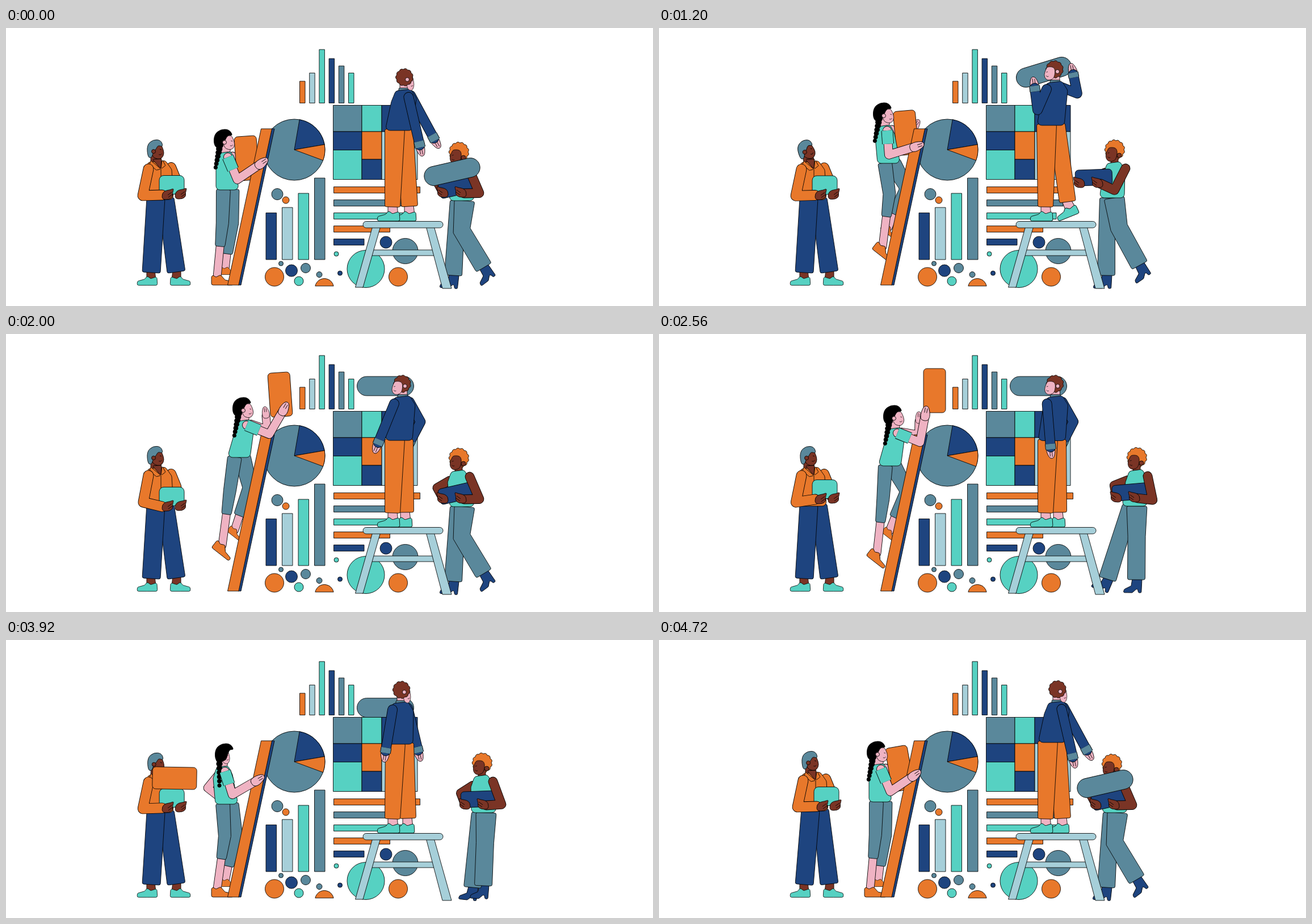
These frames come from a looping animation (1140x491 px, 4.8 s). An HTML page with a canvas:

```html
<!DOCTYPE html>
<html lang="en">
<meta charset="utf-8">
<title>Building with charts</title>
<style>
html, body { margin: 0; width: 100%; height: 100%; overflow: hidden; background: #fff }
canvas { display: block }
</style>
<canvas id="stage" width="1140" height="491"></canvas>
<script>
const g = document.getElementById('stage').getContext('2d');
const ORANGE = '#e8782b', NAVY = '#1e447f', TEAL = '#56d1c2', SLATE = '#5a889b',
  PALE = '#a6cfd9', PINK = '#efb3c3', BROWN = '#7a3425', BLACK = '#000';
const LOOP = 4800, STEP = 80, LAST = LOOP - STEP, LINE = .85;
let t = 0;

// ---- motion: a track is a few keys [time, ...values], eased, closing on its first key ----
const clamp = u => Math.min(1, Math.max(0, u));
const ease = u => u * u * (3 - 2 * u);
const mix = (a, b, u) => a.map((v, i) => v + (b[i] - v) * u);
const add = ([x, y], dx, dy) => [x + dx, y + dy];
const track = (...k) => k.at(-1)[0] < LAST ? [...k, [LAST, ...k[0].slice(1)]] : k;
function now(keys) {
  const i = keys.findIndex(k => k[0] > t);
  if (i < 0) return keys.at(-1).slice(1);
  if (!i) return keys[0].slice(1);
  const [a, b] = [keys[i - 1], keys[i]];
  return mix(a, b, ease((t - a[0]) / (b[0] - a[0]))).slice(1);
}
const pose = rig => Object.fromEntries(Object.entries(rig).map(([k, v]) => [k, now(v)]));

// elbow or knee between a and b for two bones; bend is the side, or less for foreshortening
function joint(a, b, l1, l2, bend) {
  const dx = b[0] - a[0], dy = b[1] - a[1], d = Math.hypot(dx, dy) || 1;
  const along = d < l1 + l2 ? (d * d + l1 * l1 - l2 * l2) / (2 * d) : d * l1 / (l1 + l2);
  const h = bend * Math.sqrt(Math.max(0, l1 * l1 - along * along)) * (d < l1 + l2);
  return [a[0] + (dx * along - dy * h) / d, a[1] + (dy * along + dx * h) / d];
}
const bearing = (a, b) => Math.atan2(b[1] - a[1], b[0] - a[0]) * 180 / Math.PI;

// ---- drawing ----
function paint(fill, build) {
  g.beginPath();
  build();
  g.fillStyle = fill;
  g.fill();
  g.stroke();
}
function poly(fill, p, r = 3) {
  const n = p.length;
  paint(fill, () => {
    g.moveTo((p[0] + p[n - 2]) / 2, (p[1] + p[n - 1]) / 2);
    for (let i = 0; i < n; i += 2) g.arcTo(p[i], p[i + 1], p[(i + 2) % n], p[(i + 3) % n], r);
    g.closePath();
  });
}
function blob(fill, p) {
  const n = p.length;
  paint(fill, () => {
    g.moveTo((p[0] + p[n - 2]) / 2, (p[1] + p[n - 1]) / 2);
    for (let i = 0; i < n; i += 2)
      g.quadraticCurveTo(p[i], p[i + 1], (p[i] + p[(i + 2) % n]) / 2, (p[i + 1] + p[(i + 3) % n]) / 2);
    g.closePath();
  });
}
const rect = (fill, x, y, x2, y2, r = 0) => paint(fill, () => g.roundRect(x, y, x2 - x, y2 - y, r));
const disc = (fill, x, y, r) => paint(fill, () => g.arc(x, y, r, 0, 7));
function line(...p) {
  g.beginPath();
  for (let i = 0; i < p.length; i += 2) g.lineTo(p[i], p[i + 1]);
  g.stroke();
}
function at(x, y, deg, draw, sx = 1, sy = 1) {
  g.save();
  g.translate(x, y);
  g.rotate(deg * Math.PI / 180);
  g.scale(sx, sy);
  draw();
  g.restore();
}
function block(fill, [x, y, deg, s = 1], w, h, r) {
  if (s > 0) at(x, y, deg, () => rect(fill, -w / 2, -h / 2, w / 2, h / 2, r), s, s);
}
function limb(fill, points, w, cap = 'round') {
  g.save();
  g.lineCap = cap;
  g.lineJoin = 'round';
  for (const [c, d] of [[BLACK, w + LINE], [fill, w - LINE]]) {
    g.strokeStyle = c;
    g.lineWidth = d;
    line(...points.flat());
  }
  g.restore();
}
// cloth leg through joints, one width per joint
function taper(fill, joints, widths) {
  const side = s => joints.map(([x, y], i) => {
    const a = joints[Math.max(0, i - 1)], b = joints[Math.min(joints.length - 1, i + 1)];
    const d = Math.hypot(b[0] - a[0], b[1] - a[1]) || 1, w = s * widths[i] / 2;
    return [x + (b[1] - a[1]) / d * w, y - (b[0] - a[0]) / d * w];
  });
  poly(fill, [...side(1), ...side(-1).reverse()].flat(), 3);
}
const torso = (fill, [nx, ny], [hx, hy], s, w) =>
  poly(fill, [nx - s * .65, ny + 3, nx + s * .55, ny, nx + s, ny + 16, hx + w, hy, hx - w, hy, nx - s, ny + 22], 7);

function hand(skin, from, [x, y], s = 1) {
  at(x, y, bearing(from, [x, y]), () => {
    blob(skin, [-5, -6, 4, -8, 13, -7, 21, -4, 21, 3, 12, 7, 3, 9, -5, 6]);
    line(9, -2, 18, -2);
    line(9, 2, 17, 2);
  }, s, s);
}
function fist(skin, [x, y], flip = 1) {
  at(x, y, 0, () => {
    blob(skin, [-9, -3, -3, -8, 5, -9, 12, -12, 9, -3, 10, 3, 4, 8, -9, 8]);
    line(1, 0, 8, -5);
    line(2, 4, 9, -1);
  }, flip);
}
// footwear hangs from the middle of the trouser cuff
function shoe(skin, x, y, deg = 0, s = 1, flip = 1) {
  at(x, y, deg, () => {
    poly(skin, [-9, 16, 9, 16, 7, -2, -9, -2], 1);
    poly(TEAL, [-28, 26, -27, 18, -13, 14, -8, 8, -1, 13, 11, 9, 12, 26], 3);
  }, s * flip, s);
}
const boot = (knee, [x, y]) => at(x + 1, y + 1, (bearing(knee, [x, y]) - 90) * 1.2, () =>
  poly(NAVY, [-24, 22, -22, 16, -10, 10, -8, -3, 9, -3, 8, 22, 3, 22, 1, 14, -8, 22], 2));
const flat = ([x, y], deg, s) => at(x, y, deg, () =>
  poly(ORANGE, [-10, -1, -2, 4, 6, 0, 14, 9, 28, 12, 29, 18, -10, 18], 3), s, s);

// profile looking right; a negative sx looks left
function face(skin, x, y, sx = 1, s = 1) {
  at(x, y, 0, () => {
    blob(skin, [-10, -11, 6, -13, 10, -7, 14, 5, 10, 14, 2, 16, -8, 11]);
    g.beginPath();
    g.arc(6, 4, 4, .5, 2);
    g.stroke();
    line(6, -2, 9, -1);
  }, sx * s, s);
}
function curls(fill, r, n) {
  const pt = (k, d) => [d * Math.cos(k * 2 * Math.PI / n), d * Math.sin(k * 2 * Math.PI / n)];
  paint(fill, () => {
    g.moveTo(...pt(0, r));
    for (let k = 0; k < n; k++) g.quadraticCurveTo(...pt(k + .5, r * 1.25), ...pt(k + 1, r));
  });
}

// ---- charts and furniture ----
function bars(list, w, base) {
  for (const [x, top, c] of list) rect(c, x, top, x + w, base);
}
function charts() {
  [[94, ORANGE], [79.5, PALE], [38, TEAL], [54, NAVY], [67, SLATE], [79.5, TEAL]]
    .forEach(([top, c], i) => bars([[517.5 + 17.2 * i, top, c]], 9.5, 132.5));
  [[326.5, NAVY], [317, PALE], [292, TEAL], [265, SLATE]]
    .forEach(([top, c], i) => bars([[458 + 28.5 * i, top, c]], 18.5, 409));
  [[729.5, ORANGE], [712, SLATE], [700, TEAL], [676.5, ORANGE], [631, NAVY]]
    .forEach(([x, c], i) => rect(c, 577.5, 280.5 + 23 * i, x, 291.5 + 23 * i));
  disc(SLATE, 508, 215, 54);
  for (const [c, a, b] of [[NAVY, -1.4, -.17], [ORANGE, -.17, .356]])
    paint(c, () => { g.moveTo(508, 215); g.arc(508, 215, 54, a, b); g.closePath(); });
  // tiled columns: left, right, then colour and lower edge of each tile
  for (const [x, x2, ...tiles] of [
    [576.5, 627, [SLATE, 183], [NAVY, 215.5], [TEAL, 267.5]],
    [627, 662, [TEAL, 183], [ORANGE, 232], [NAVY, 267.5]],
    [662, 725, [NAVY, 183], [PALE, 267.5]]]) {
    let y = 136.5;
    for (const [c, y2] of tiles) rect(c, x, y, x2, y = y2);
  }
  for (const [x, y, r, c] of [
    [478, 293.5, 10, SLATE], [493, 304, 6, ORANGE], [484.5, 416, 4, SLATE], [503, 428.5, 10.5, NAVY],
    [528, 424, 8.5, SLATE], [473, 439.5, 16.5, ORANGE], [516, 447, 8, TEAL], [552, 435.5, 5, SLATE],
    [588.5, 433, 4, NAVY], [582, 399, 4, TEAL], [634, 425.5, 33, TEAL], [669.5, 378.5, 10.5, NAVY],
    [703.5, 394, 22.5, SLATE], [691, 439.5, 16.5, ORANGE]]) disc(c, x, y, r);
  paint(ORANGE, () => { g.arc(561, 459, 16.5, Math.PI + .2, -.2); g.closePath(); });
}
function ladder() {
  poly(NAVY, [468, 178, 473, 178, 414, 454, 409, 454], 0);
  poly(ORANGE, [449.5, 178, 468.5, 178, 410, 454, 390.5, 454], 0);
}
function stool() {
  rect(PALE, 640, 392, 758, 402);
  poly(PALE, [646, 350, 660, 350, 629, 458, 615.5, 458], 0);
  poly(PALE, [740, 350, 754, 350, 785, 460, 769, 460], 0);
  rect(PALE, 629, 341.5, 770, 353, 6);
}

// ---- man with the teal box ----
const porter = {
  lean: track([0, 0, 0], [2560, 0, 1], [3280, 5, 1], [3360, 5, 1], [3800, 0, 2], [LAST, 3, -1]),
  tilt: track([0, 0], [1200, -12], [2000, 0], [2560, 0], [3280, -12], [3800, 2]),
  lift: track([0, 0], [1200, 0], [2000, 9], [2560, -4], [3280, -11], [3800, 0]),
  foot: track([0, 300, 431, 0], [2800, 300, 431, 0], [3280, 308, 427, -18], [3800, 300, 431, 0])
};
function drawPorter() {
  const { lean: [dx, dy], tilt: [tilt], lift: [lift], foot } = pose(porter);
  const neck = [267 + dx, 234 + dy], hip = [272 + dx, 303 + dy], box = [292 + dx, 277 + dy + lift];
  const head = [264 + dx + tilt / 3, 215 + dy, tilt], shoulder = add(neck, -16, 15), wrist = add(box, -17, 18);
  shoe(BROWN, 256, 431, 0, .9);
  shoe(BROWN, ...foot, .9, -1);
  taper(NAVY, [add(hip, 10, -2), foot], [28, 32]);
  taper(NAVY, [add(hip, -8, -2), [256, 432]], [32, 32]);
  at(...head, () => rect(BROWN, -9, 8, 9, 30));
  limb(ORANGE, [add(neck, 24, 12), add(neck, 33, 34), add(neck, 36, 51)], 17);
  torso(ORANGE, neck, hip, 25, 23);
  at(...neck, 0, () => {
    poly(BROWN, [-9, -2, 7, -3, 6, 15], 1);
    poly(ORANGE, [-12, 0, 6, 15, -2, 17, -14, 7], 1);
    poly(ORANGE, [8, -2, 14, 9, 6, 15], 1);
    line(6, 15, 6, 50);
  });
  at(...head, () => {
    face(BROWN, 1, 1);
    blob(SLATE, [-14, 14, -16, -8, -5, -18, 9, -17, 13, -5, 4, -8, 1, -2, -5, 5, -7, 14]);
    disc(BROWN, -4, 3, 3.5);
  });
  block(TEAL, [...box, 0], 44, 33, 8);
  limb(ORANGE, [shoulder, joint(shoulder, wrist, 48, 34, 1), wrist], 18);
  fist(BROWN, add(box, 15, 17));
  fist(BROWN, add(box, -8, 18));
}

// ---- woman on the ladder ----
const climber = {
  neck: track([0, 387, 218], [1200, 398, 171], [2000, 420, 151], [2560, 416, 165], [3280, 421, 201], [3920, 382, 222], [4080, 382, 222]),
  hip: track([0, 390, 286], [1200, 405, 239], [2000, 410, 218], [2560, 406, 233], [3280, 409, 265], [3920, 389, 290]),
  look: track([0, 0, 0], [2560, 0, 0], [3280, 14, 0], [3920, 0, 1], [4080, 0, 1]),
  near: track([0, 444, 243], [1200, 447, 211], [2000, 486, 139], [2560, 468, 148], [3280, 446, 240], [3920, 437, 251]),
  far: track([0, 440, 235], [1200, 449, 176], [2000, 458, 145], [2560, 458, 154], [3280, 445, 238], [3920, 374, 276], [4080, 374, 276]),
  footNear: track([0, 372, 436], [1200, 394, 382], [2000, 381, 369], [2560, 384, 383], [3280, 390, 390], [3920, 372, 436]),
  footFar: track([0, 386, 422], [1200, 404, 348], [2000, 403, 342], [2560, 406, 344], [3280, 398, 394], [3920, 386, 422])
};
function drawClimberFar() {
  const { neck, look: [, turn], far } = pose(climber);
  const shoulder = add(neck, 12 - 20 * turn, 8 + 8 * turn), elbow = joint(shoulder, far, 30, 24, 1);
  limb(PINK, [shoulder, elbow, far], 14);
  hand(PINK, elbow, far, .8);
}
function climberLeg(hip, foot, l1, l2, bend, cuffAt, ground, widths, size) {
  const knee = joint(hip, foot, l1, l2, bend), cuff = mix(knee, foot, cuffAt);
  limb(PINK, [cuff, add(foot, 0, 4)], 14);
  flat(foot, 38 * clamp((ground - foot[1]) / 30), size);
  taper(SLATE, [hip, knee, cuff], widths);
}
function drawClimber() {
  const { neck, hip, look: [tilt, turn], footNear, footFar } = pose(climber);
  climberLeg(add(hip, 6, -1), footFar, 60, 78, -.7, .7, 422, [30, 27, 20], .75);
  climberLeg(add(hip, -7, -1), footNear, 60, 92, -.4, .45, 436, [25, 22, 17], 1);
  const head = add(neck, 4 + tilt * .6, tilt * .35 - 17);
  limb(PINK, [add(head, -2, 4), add(neck, 0, 2)], 15);
  torso(TEAL, neck, hip, 17, 20);
  at(...head, tilt, () => {
    face(PINK, 0, 0, 1 - turn * .3, .9);
    g.translate(turn * 7, 0);
    blob(BLACK, [-25, 5, -24, -13, -13, -22, 2, -22, 9, -11, 0, -12, -5, -3 + turn * 10, -10, 8, -17, 13]);
    if (turn < .5) disc(PINK, -6, 1, 3.5);
  });
  const hang = (11 + 3 * tilt - 11 * turn) * Math.PI / 180, nape = add(head, -14 + 4 * turn, 6);
  for (let i = 0; i <= 6; i++) {
    const d = i * (40 + 6 * turn) / 6;
    disc(BLACK, nape[0] - d * Math.sin(hang), nape[1] + d * Math.cos(hang), 5.6 - .4 * i);
  }
}
function drawClimberNear() {
  const { neck, near } = pose(climber), shoulder = add(neck, 4, 10), elbow = joint(shoulder, near, 43, 44, 1);
  limb(PINK, [shoulder, elbow, near], 15);
  limb(TEAL, [shoulder, mix(shoulder, elbow, .55)], 20, 'butt');
  hand(PINK, elbow, near);
}

// ---- man on the stool; the last number of a hand is the elbow side ----
const builder = {
  neck: track([0, 701, 108], [1200, 698, 94], [1560, 698, 94], [2000, 699, 109], [3280, 698, 109], [3920, 696, 109]),
  hip: track([0, 692, 181], [1200, 690, 172], [1560, 690, 172], [2000, 692, 188], [3280, 692, 189], [3920, 693, 184]),
  turn: track([0, 1], [1200, -1], [2560, -1], [3280, .3], [3920, .8]),
  near: track([0, 729, 207, 0], [1200, 662, 106, -1], [1560, 662, 106, -1], [2000, 656, 192, 0], [2560, 690, 200, 0], [3280, 665, 200, 0], [3920, 669, 196, 0]),
  far: track([0, 754, 195, 0], [1200, 730, 82, .7], [1560, 730, 82, .7], [2000, 710, 194, -1], [3280, 710, 194, -1], [3920, 726, 195, 0]),
  foot: track([0, 711, 315, 0], [1200, 720, 307, -22], [1560, 720, 307, -22], [2000, 704, 315, 0], [3280, 704, 315, 0], [3920, 708, 315, 0])
};
function sleeve(shoulder, [x, y, side], l1, l2) {
  const wrist = [x, y], elbow = joint(shoulder, wrist, l1, l2, side);
  hand(PINK, elbow, wrist, .95);
  limb(NAVY, [shoulder, elbow, wrist], 17);
  limb(SLATE, [mix(elbow, wrist, .84), mix(elbow, wrist, 1.1)], 18, 'butt');
}
function drawBuilder() {
  const { neck, hip, turn: [turn], near, far, foot } = pose(builder);
  sleeve(add(neck, 12, 11), far, 40, 44);
  shoe(PINK, ...foot);
  shoe(PINK, 682, 315);
  taper(ORANGE, [add(hip, 11, -2), foot], [29, 29]);
  taper(ORANGE, [add(hip, -7, -2), [681, 316]], [35, 27]);
  at(...neck, 0, () => {
    rect(PINK, -7, -14, 8, 3);
    rect(SLATE, -9, -2, 9, 5, 2);
  });
  torso(NAVY, neck, hip, 22, 24);
  at(neck[0] + turn, neck[1] - 21, 0, () => {
    if (turn >= 0) face(PINK, 6 + 3 * turn, 8, .6);
    curls(BROWN, 14, 11);
    if (turn < 0) face(PINK, -7, 6, -1, .85);
    disc(PINK, 5, 4, 3.5);
  });
  // the near shoulder slides across the back as he turns
  const reach = clamp((near[0] - 690) / 40);
  sleeve(add(neck, -15 + 24 * reach, 14), near, 40, 39);
}

// ---- woman with the navy box; the box leads both hands ----
const carrier = {
  neck: track([0, 797, 240], [720, 802, 236], [1200, 802, 236], [2000, 797, 240], [2560, 841, 239], [3280, 838, 238], [4320, 838, 238]),
  hip: track([0, 804, 305], [720, 798, 300], [1200, 798, 300], [2000, 804, 305], [2560, 838, 304], [3280, 842, 305], [4320, 842, 305]),
  box: track([0, 795, 281, -13], [720, 766, 264, -2], [1200, 766, 264, -2], [2000, 795, 281, -13], [2560, 831, 279, -5], [3280, 833, 287, -5], [3920, 834, 281, -2], [4320, 834, 281, -2]),
  left: track([0, 788, 437], [2000, 788, 437], [2560, 790, 433], [3280, 822, 437], [4320, 822, 437]),
  right: track([0, 842, 423], [720, 847, 419], [1760, 847, 419], [2000, 842, 423], [2560, 841, 434], [4320, 841, 434])
};
function drawCarrier() {
  const { neck, hip, box, left, right } = pose(carrier);
  const hipL = add(hip, -8, 0), hipR = add(hip, 4, 0), knee = joint(hipR, right, 53, 76, 1);
  boot(hipL, left);
  boot(knee, right);
  taper(SLATE, [hipL, left], [27, 31]);
  taper(SLATE, [hipR, knee, right], [36, 31, 31]);
  const shL = add(neck, -16, 19), shR = add(neck, 20, 12), wristL = add(box, -25, 10), wristR = add(box, 12, 11);
  limb(BROWN, [shL, joint(shL, wristL, 25, 22, 1), wristL], 15);
  at(neck[0] + 1, neck[1] - 21, 0, () => {
    curls(ORANGE, 16, 13);
    rect(BROWN, -7, 12, 6, 27, 2);
  });
  torso(TEAL, neck, hip, 19, 22);
  at(neck[0] + 1, neck[1] - 21, 0, () => {
    face(BROWN, -4, 7, -1, .9);
    disc(BROWN, 8, 10, 4);
  });
  block(NAVY, box, 65, 28, 6);
  fist(BROWN, wristL, -1);
  limb(BROWN, [shR, joint(shR, wristR, 43, 27, -1), wristR], 16);
  fist(BROWN, add(wristR, -5, -1), -1);
}

// ---- travelling pieces: time, x, y, angle, scale ----
const cardUp = [[0, 424, 230, -4, 1], [1200, 435, 185, -5, 1], [2000, 483, 107, -4, 1], [2560, 485.5, 100, 0, 1]];
const cardSink = [[2640, 485.5, 100, 0, 1], [3280, 485.5, 120, 0, .64], [3840, 485.5, 190, 0, .3]];
const cardNew = [[3040, 297, 173.5, -89, 0], [3200, 297, 173.5, -89, 1], [3360, 297, 173.5, -89, 1],
  [3760, 297, 244, -89, 1], [4080, 297, 244, -89, 1], [LAST, 424, 227, -10, 1]];
const pillUp = [[0, 786, 254, -13, 1], [700, 715, 150, -15, 1], [1200, 678, 78, -17, 1],
  [1480, 667, 53, -15, 1], [2000, 668.5, 92, 0, 1]];
const pillSink = [[3520, 668.5, 92, 0, 1], [4400, 668.5, 156, 0, 1]];
const pillNew = [[4000, 843, 170, 0, 0], [4160, 843, 170, 0, 1], [4480, 834, 236, -3, 1], [LAST, 786, 254, -13, 1]];
const card = keys => block(ORANGE, now(keys), 39, 78, 6);
const pill = keys => block(SLATE, now(keys), 100, 34, 17);

function draw() {
  g.clearRect(0, 0, 1140, 491);
  g.strokeStyle = BLACK;
  g.lineWidth = LINE;
  if (t > 2560 && t < 3840) card(cardSink);
  if (t >= 2000 && t < 4400) pill(pillSink);
  charts();
  drawPorter();
  drawClimberFar();
  if (t <= 2560) card(cardUp);
  else if (t > 3040) card(cardNew);
  drawClimber();
  ladder();
  drawClimberNear();
  drawCarrier();
  stool();
  if (t < 2000) pill(pillUp);
  else if (t > 4000) pill(pillNew);
  drawBuilder();
}
function tick() {
  t = Math.floor(performance.now() / STEP) * STEP % LOOP;
  draw();
  requestAnimationFrame(tick);
}
tick();
</script>
</html>
```
